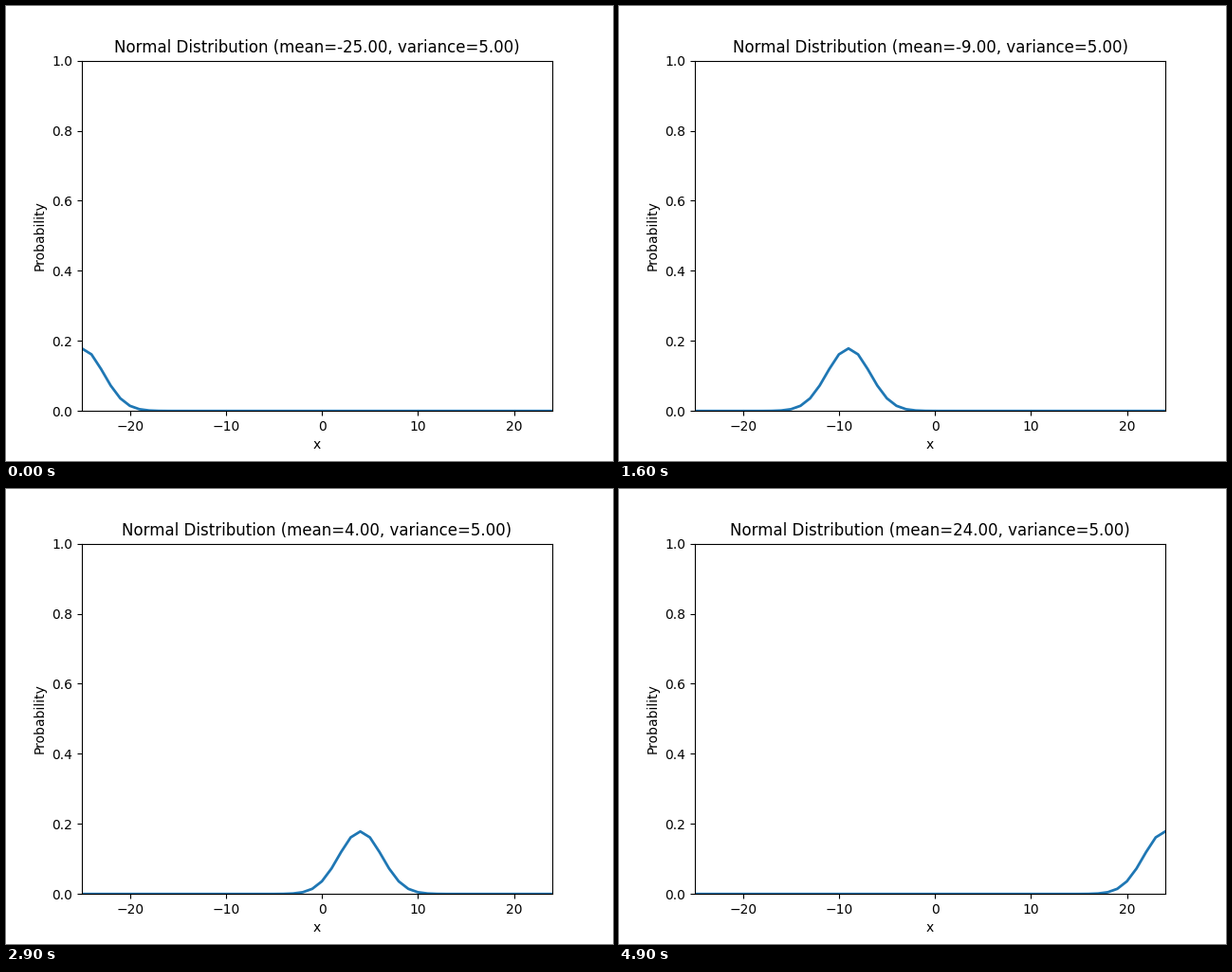
These frames come from a looping animation (640 by 480 pixels, 5000 ms). A matplotlib script:

```python
import numpy as np
import matplotlib.pyplot as plt
from matplotlib.animation import FuncAnimation

VARIANCE = 5.0
x = np.arange(-25, 25)


def normal_pdf(x, mean, variance):
    return np.exp(-(x - mean) ** 2 / (2 * variance)) / np.sqrt(2 * np.pi * variance)


plt.rcParams["font.family"] = "DejaVu Sans"
fig, ax = plt.subplots(figsize=(6.4, 4.8), dpi=100)
ax.set_xlim(x[0], x[-1])
ax.set_ylim(0, 1)
ax.set_xlabel("x")
ax.set_ylabel("Probability")
title = ax.set_title("")
line, = ax.plot([], [], lw=2)


def update(frame):
    mean = x[frame]
    line.set_data(x, normal_pdf(x, mean, VARIANCE))
    title.set_text(f"Normal Distribution (mean={mean:.2f}, variance={VARIANCE:.2f})")
    return line, title


anim = FuncAnimation(fig, update, frames=len(x), interval=100, repeat=True)
plt.show()
```
